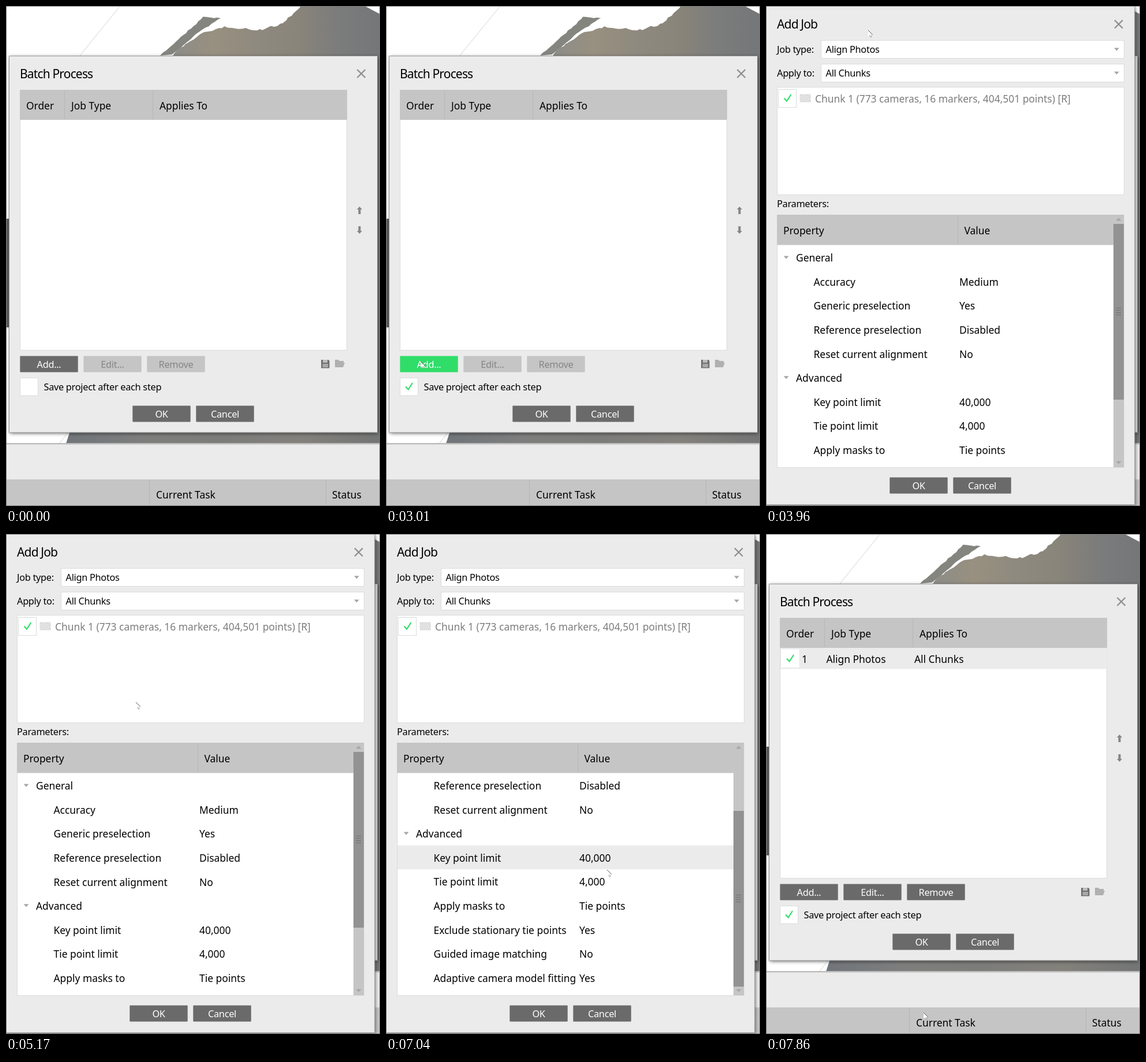
An HTML page that plays this animation: 648 px wide and 865 px high, repeating every 8000 ms.

```html
<!DOCTYPE html>
<html lang="en">
<head>
<meta charset="utf-8">
<title>Batch process</title>
<style>
html, body { margin: 0; width: 100%; height: 100%; overflow: hidden; background: #fff; }
svg { display: block; width: 648px; height: 865px; }
text { font-family: "Noto Sans", "Open Sans", sans-serif; white-space: pre; }
.cell { font-size: 17.4px; }
.label { font-size: 16.3px; letter-spacing: -.017em; }
.title { font-size: 21px; letter-spacing: -.04em; }
</style>
</head>
<body>
<svg id="stage" viewBox="0 0 648 865" xmlns="http://www.w3.org/2000/svg"></svg>
<script>
const LOOP = 8000, START = 560, STEP = 135;
const OPEN = 3290, CLOSE = 7860, SCROLL = 6510, TICK = 2180;
const ROW_H = 41.55, ROW_TOP = 414;
const PANEL = '#ebebeb', HEAD = '#c5c5c5', DARK = '#6a6a6a', GREEN = '#30dd69';

// Pointer way points: step, x, y. Straight runs between, redrawn once per STEP.
const way = [
  [0, 411, 783], [2, 190, 661], [4, 118, 641], [7, 51, 659], [15, 48, 659],
  [18, 60, 615], [22, 60, 616], [24, 193, 71], [25, 177, 42], [27, 169, 72],
  [29, 169, 72], [31, 173, 111], [34, 225, 291], [36, 283, 377], [39, 394, 475],
  [42, 387, 548], [47, 387, 548], [48, 383, 581], [50, 305, 801], [52, 273, 828]
];

function pointerAt(t) {
  const k = Math.floor((t - START) / STEP);
  const i = way.findIndex(p => p[0] > k);
  if (i < 0) return way[way.length - 1].slice(1);
  if (i === 0) return [-50, -50];
  const [a, ax, ay] = way[i - 1], [b, bx, by] = way[i], u = (k - a) / (b - a);
  return [ax + (bx - ax) * u, ay + (by - ay) * u];
}

const params = [
  ['General'], ['Accuracy', 'Medium'], ['Generic preselection', 'Yes'],
  ['Reference preselection', 'Disabled'], ['Reset current alignment', 'No'],
  ['Advanced'], ['Key point limit', '40,000'], ['Tie point limit', '4,000'],
  ['Apply masks to', 'Tie points'], ['Exclude stationary tie points', 'Yes'],
  ['Guided image matching', 'No'], ['Adaptive camera model fitting', 'Yes']
];

const rect = (x, y, w, h, fill, extra = '') =>
  `<rect x="${x}" y="${y}" width="${w}" height="${h}" fill="${fill}" ${extra}/>`;
const shape = (d, fill, extra = '') => `<path d="${d}" fill="${fill}" ${extra}/>`;
const line = (d, color, width = 1, extra = '') =>
  `<path d="${d}" fill="none" stroke="${color}" stroke-width="${width}" ${extra}/>`;
const text = (x, y, str, cls = 'cell', fill = '#000', extra = '') =>
  `<text x="${x}" y="${y}" class="${cls}" fill="${fill}" ${extra}>${str}</text>`;
const field = (x, y, w, h) => rect(x + .5, y + .5, w - 1, h - 1, '#fff', 'stroke="#dcdcdc"');
const cross = (x, y) => line(`M${x - 7} ${y - 7}l14 14m0 -14l-14 14`, '#8c8c8c', 2.2);
const tick = (x, y, extra = '') => line(`M${x} ${y}l4.5 5 7.5 -11.5`, GREEN, 2.2, extra);
const wedge = (x, y, s) => shape(`M${x - 4.5} ${y - 2.5 * s}h9l-4.5 ${5 * s}z`, '#a6a6a6');
const arrow = (x, y, s) => shape(`M${x} ${y}l4.5 ${5 * s}h-2.5v${8 * s}h-4v${-8 * s}h-2.5z`, '#858585');
const button = (x, y, label, id = '') =>
  `<g ${id && `id="${id}"`}>${rect(x + .3, y + .5, 100.4, 28, DARK, 'rx="1"')}` +
  text(x + 50.5, y + 20.5, label, 'label', '#fff', 'text-anchor="middle"') + '</g>';
const windowBox = (x, y, w, h) =>
  rect(x, y, w, h, PANEL, 'filter="url(#shadow)"') + rect(x - .5, y - .5, w + 1, h + 1, 'none', 'stroke="#9a9a9a"');

let seed = 7;
const random = () => (seed = seed * 16807 % 2147483647) / 2147483647;

// A rough edge: straight runs between points, broken into short jittered pieces.
function rough(points, size) {
  let d = '';
  points.forEach(([x, y], i) => {
    const [px, py] = points[i - 1] || [x, y];
    const n = Math.max(1, Math.round(Math.hypot(x - px, y - py) / 6));
    for (let k = 1; k <= n; k++) {
      const jx = (random() - .5) * size, jy = (random() - .5) * size;
      d += `${d ? 'L' : 'M'}${(px + (x - px) * k / n + jx).toFixed(1)} ${(py + (y - py) * k / n + jy).toFixed(1)}`;
    }
  });
  return d;
}

function terrain() {
  const ridge = [[288, 85], [328, 53], [380, 35], [440, 42], [480, 29], [512, 0]];
  const spur = [[268, 85], [342, 19], [372, 21], [330, 48], [288, 84]];
  return rect(0, 0, 648, 865, '#fff') +
    line('M197 1L127 87M108 737L93 756', '#d4d4d4') +
    shape(rough(spur, 2) + 'z', '#858580') +
    shape(rough(ridge, 4) + 'H620L648 14V90H286z', 'url(#rock)') +
    rect(642, 86, 6, 652, '#777879') + rect(0, 368, 7, 188, '#5c5e5f') +
    shape('M111 735H648V757H104z', 'url(#ground)');
}

function mainWindow() {
  return terrain() +
    rect(0, 757, 648, 108, PANEL) + rect(0, 756, 648, 2.5, '#bdbdbd') +
    rect(0, 819, 648, 46, HEAD) +
    line('M248.5 820V865M554.5 820V865', '#b6b6b6') +
    text(260, 852, 'Current Task') + text(565, 852, 'Status');
}

function batchDialog() {
  return windowBox(6, 87, 637, 650.5) +
    text(24, 125, 'Batch Process', 'title') + cross(615.5, 117) +
    field(24, 145, 567, 451) + rect(24, 145, 567, 52, HEAD) +
    line('M101.5 146V196M254.5 146V196', '#b7b7b7') +
    text(35, 178.5, 'Order') + text(113, 178.5, 'Job Type') + text(266, 178.5, 'Applies To') +
    '<g id="job">' + rect(25, 197, 565.5, 36.5, PANEL) + rect(26, 199.5, 31.5, 31.5, '#fff') +
    tick(36, 215.5) + text(62, 222.5, '1') + text(104.5, 222.5, 'Align Photos') +
    text(257, 222.5, 'All Chunks') + '</g>' +
    arrow(612.5, 347, 1) + arrow(612.5, 394, -1) +
    button(24, 605, 'Add...', 'add') + button(134, 605, 'Edit...', 'edit') +
    button(244, 605, 'Remove', 'remove') +
    shape('M546 612h12.5l2 2v12.5h-14.5z', '#6f6f6f') +
    rect(549, 612, 8, 5, '#bcbcbc') + rect(548.5, 619, 9.5, 6, '#a9a9a9') +
    shape('M570 612h6l1.5 2h7.5v3h2l-3 8h-14z', '#b0b0b0') +
    field(24, 643, 32, 31.5) + tick(34, 658.5, 'id="save"') +
    text(65.5, 665, 'Save project after each step', 'label') +
    button(219, 691, 'OK') + button(329, 691, 'Cancel');
}

function checker(x, y) {
  let s = rect(x, y, 18, 13, '#f4f4f4', 'stroke="#dadada" stroke-width=".8"');
  for (let i = 0; i < 24; i++) {
    const r = Math.floor(i / 6);
    s += rect(x + (i % 6) * 3 + (r % 2) * 1.5, y + r * 3.25, 1.6, 3.25, '#d0d0d0');
  }
  return s;
}

function paramRow([name, value], i) {
  const y = ROW_TOP + i * ROW_H, base = y + 28.3;
  return value
    ? text(82.5, base, name) + text(335, base, value)
    : wedge(35, y + 21, 1) + text(52, base, name);
}

const combo = (y, name, value) =>
  text(19, y + 22, name, 'label') + field(95, y, 526, 32) +
  text(103.5, y + 22, value, 'label') + wedge(607.5, y + 16, 1);

function jobDialog() {
  return windowBox(1, 1, 637.5, 861.5) +
    text(19, 39, 'Add Job', 'title') + cross(611, 31.5) +
    combo(59, 'Job type:', 'Align Photos') + combo(100, 'Apply to:', 'All Chunks') +
    field(19, 140, 602, 187) + field(21, 144, 32, 32) + tick(31.5, 159.5) + checker(59, 153) +
    text(85, 167, 'Chunk 1 (773 cameras, 16 markers, 404,501 points) [R]', 'cell', '#7c7c7c') +
    text(19, 348, 'Parameters:', 'label') +
    field(19, 361, 602, 438) +
    rect(20, 0, 582, ROW_H, PANEL, 'id="hover"') +
    '<g clip-path="url(#body)"><g id="rows">' + params.map(paramRow).join('') + '</g></g>' +
    rect(19, 361, 583, 52.5, HEAD) + line('M332.5 362V413', '#b7b7b7') +
    text(30, 395, 'Property') + text(343.5, 395, 'Value') +
    rect(602, 361, 18, 437, HEAD) + wedge(611, 369, -1) + wedge(611, 790, 1) +
    '<g id="thumb">' + rect(602, 377, 18, 304, '#929292') +
    line('M606 522.5h9m-9 4h9m-9 4h9m-9 4h9', '#707070') + '</g>' +
    button(214, 815, 'OK', 'ok') + button(324, 815, 'Cancel');
}

const pointer = '<g id="pointer">' +
  shape('M0 0V10.6L2.4 8.4 4.2 12.2 6 11.4 4.4 7.8H7.8z', '#fff') +
  line('M0 0L7.8 7.8', '#555') +
  line('M4.6 8L6.2 11.3 4.2 12.2 2.5 8.6', '#777', .7) + '</g>';

const gradient = (id, colors) => `<linearGradient id="${id}">` + colors.map((c, i) =>
  `<stop offset="${i / (colors.length - 1)}" stop-color="${c}"/>`).join('') + '</linearGradient>';

document.getElementById('stage').innerHTML = '<defs>' +
  gradient('rock', ['#8c8c89', '#989080', '#8f8a7f', '#8a857a', '#7b7c7c', '#747678']) +
  gradient('ground', ['#70757a', '#7e7e7d', '#7c7c7b', '#83817b', '#737475']) +
  `<filter id="shadow" x="-5%" y="-5%" width="110%" height="110%">
    <feDropShadow dx="1" dy="1.5" stdDeviation="3" flood-color="#000" flood-opacity=".65"/>
  </filter>
  <clipPath id="body"><rect x="20" y="414" width="582" height="384"/></clipPath>
</defs>` + mainWindow() + batchDialog() + `<g id="dialog">${jobDialog()}</g>` +
  rect(.5, .5, 647, 864, 'none', 'stroke="#777"') + pointer;

const el = id => document.getElementById(id);
const show = (id, on) => el(id).setAttribute('display', on ? 'inline' : 'none');
const move = (id, x, y) => el(id).setAttribute('transform', `translate(${x} ${y})`);
const inside = (x, y, bx, by) => x >= bx && x <= bx + 101 && y >= by && y <= by + 29;

function paint(id, fill, color = '#fff') {
  el(id).querySelector('rect').setAttribute('fill', fill);
  el(id).querySelector('text').setAttribute('fill', color);
}

function draw(t) {
  const open = t >= OPEN && t < CLOSE, done = t >= CLOSE;
  const [x, y] = pointerAt(t), hotY = y - 4;

  move('pointer', x, y);
  show('dialog', open);
  show('save', t >= TICK);
  show('job', done);

  paint('add', !open && inside(x, hotY, 24, 605) ? GREEN : DARK);
  for (const id of ['edit', 'remove']) done ? paint(id, DARK) : paint(id, HEAD, '#858585');
  paint('ok', inside(x, hotY, 214, 815) ? GREEN : DARK);

  // Rows light up once the pointer has left the spot where the dialog opened.
  const skip = t >= SCROLL ? 3 : 0;
  const row = Math.floor((hotY - ROW_TOP) / ROW_H);
  move('rows', 0, -skip * ROW_H);
  move('thumb', 0, skip * 34);
  show('hover', x > 61 && row >= 0 && row < 9);
  el('hover').setAttribute('y', ROW_TOP + row * ROW_H);
}

function frame() {
  draw(performance.now() % LOOP);
  requestAnimationFrame(frame);
}
frame();
</script>
</body>
</html>
```
